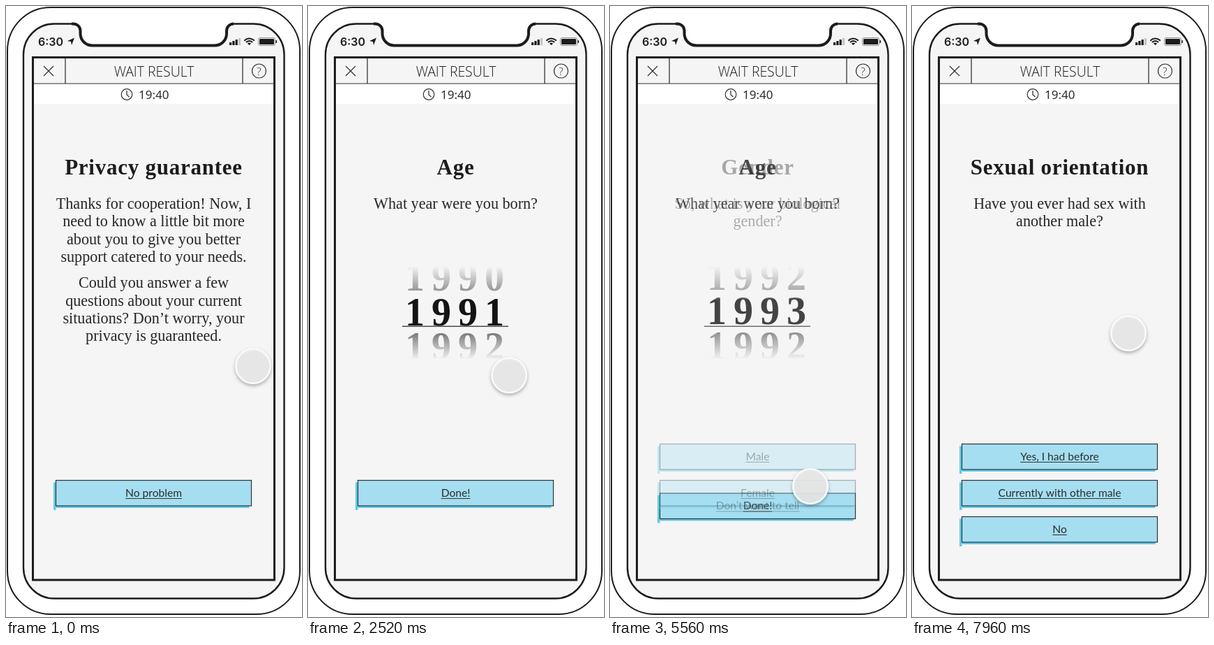
An HTML page with a canvas that plays this animation: 424 px wide and 874 px high, repeating every 8000 ms.

```html
<!DOCTYPE html>
<html lang="en">
<head>
<meta charset="utf-8">
<title>Questionnaire prototype</title>
<style>
  html, body { margin: 0; width: 100%; height: 100%; overflow: hidden; background: #fff; }
  canvas { display: block; width: 424px; height: 874px; }
</style>
</head>
<body>
<canvas id="stage"></canvas>
<script>
const W = 424, H = 874, LOOP = 8000, MID = 211.5;
const INK = '#1c1c1c', PAPER = '#f5f5f5';
const SERIF = '"Liberation Serif", serif';
const SANS = '"Noto Sans", sans-serif';
const LIGHT = '"Open Sans", sans-serif';
const canvas = document.getElementById('stage');
const ctx = canvas.getContext('2d');
const dpr = window.devicePixelRatio || 1;
canvas.width = W * dpr;
canvas.height = H * dpr;

const clamp = v => Math.min(1, Math.max(0, v));
const ease = p => p * p * (3 - 2 * p);
const ramp = (t, start, ms) => ease(clamp((t - start) / ms));
const mix = (a, b, p) => a + (b - a) * p;

const screens = [
  {
    title: 'Privacy guarantee',
    lines: ['Thanks for cooperation! Now, I', 'need to know a little bit more',
      'about you to give you better', 'support catered to your needs.',
      'Could you answer a few', 'questions about your current',
      'situations? Don’t worry, your', 'privacy is guaranteed.'],
    labels: ['', 'No problem', '']
  },
  { title: 'Age', lines: ['What year were you born?'], labels: ['', 'Done!', ''] },
  {
    title: 'Gender',
    lines: ['So, what is your biological', 'gender?'],
    labels: ['Male', 'Female', 'Don’t want to tell']
  },
  {
    title: 'Sexual orientation',
    lines: ['Have you ever had sex with', 'another male?'],
    labels: ['Yes, I had before', 'Currently with other male', 'No']
  }
];
const FADES = [1000, 5400, 6600], FADE_MS = 400;
const buttonY = i => 626.5 + i * 52;

const YEARS = [1990, 1991, 1992, 1993, 1992];
const ROW = 49.5;

// Cursor moves: start, duration, destination
const MOVES = [
  { at: 0, ms: 600, x: 345, y: 689 },
  { at: 1700, ms: 1300, x: 263, y: 457 },
  { at: 3200, ms: 1000, x: 287, y: 447 },
  { at: 4450, ms: 700, x: 287, y: 687 },
  { at: 5700, ms: 650, x: 300, y: 632 },
  { at: 7000, ms: 700, x: 310, y: 468 }
];
const HOLDS = [[700, 900], [2950, 4350], [5200, 5350], [6400, 6550]];

function line(color, width, ...points) {
  ctx.strokeStyle = color;
  ctx.lineWidth = width;
  ctx.beginPath();
  points.forEach(([x, y]) => ctx.lineTo(x, y));
  ctx.stroke();
}

function disc(x, y, r) {
  ctx.beginPath();
  ctx.arc(x, y, r, 0, Math.PI * 2);
}

function text(str, x, y, font, { color = INK, align = 'center', spacing = 0 } = {}) {
  ctx.font = font;
  ctx.fillStyle = color;
  ctx.textAlign = align;
  ctx.letterSpacing = spacing + 'px';
  ctx.fillText(str, x, y);
}

function layer(alpha, draw) {
  if (alpha <= 0) return;
  ctx.save();
  ctx.globalAlpha = alpha;
  draw();
  ctx.restore();
}

// Runs the current path round the notch, left to right
function notchPath() {
  ctx.arcTo(106.5, 25.5, 106.5, 40, 10);
  ctx.arcTo(106.5, 56.5, 150, 56.5, 17);
  ctx.arcTo(316, 56.5, 316, 40, 17);
  ctx.arcTo(316, 25.5, 340, 25.5, 10);
}

function drawPhone() {
  const l = 25, r = 398.5, top = 25.5, bottom = 847.5, radius = 44;
  ctx.fillStyle = '#fff';
  ctx.fillRect(0, 0, W, H);
  ctx.strokeStyle = INK;
  ctx.lineWidth = 2;
  ctx.beginPath();
  ctx.roundRect(2, 2, 419, 868, 62);
  ctx.stroke();

  ctx.beginPath();
  ctx.moveTo(l + radius, top);
  notchPath();
  ctx.arcTo(r, top, r, bottom, radius);
  ctx.arcTo(r, bottom, l, bottom, radius);
  ctx.arcTo(l, bottom, l, top, radius);
  ctx.arcTo(l, top, r, top, radius);
  ctx.closePath();
  ctx.fillStyle = PAPER;
  ctx.fill();
  ctx.lineWidth = 2.4;
  ctx.stroke();

  ctx.lineWidth = 4;
  ctx.beginPath();
  ctx.moveTo(94, top);
  notchPath();
  ctx.stroke();
}

function drawStatus() {
  text('6:30', 46, 56.5, '600 16px Inter, sans-serif', { align: 'left' });
  ctx.beginPath();
  [[98, 45.5], [94, 56], [93, 51], [88, 50]].forEach(([x, y]) => ctx.lineTo(x, y));
  ctx.fill();

  for (let i = 0; i < 4; i++) {
    ctx.fillStyle = i < 3 ? INK : '#c4c4c4';
    const h = 4 + i * 2;
    ctx.fillRect(320 + i * 4.3, 56 - h, 3.2, h);
  }
  ctx.strokeStyle = INK;
  for (const [r, width] of [[9.5, 2], [6, 2], [1.7, 3.4]]) {
    ctx.lineWidth = width;
    ctx.beginPath();
    ctx.arc(348.5, 56, r, -Math.PI * 0.77, -Math.PI * 0.23);
    ctx.stroke();
  }

  ctx.fillStyle = INK;
  ctx.lineWidth = 0.8;
  ctx.strokeStyle = '#777';
  ctx.beginPath();
  ctx.roundRect(361.5, 45.5, 24, 11, 2.5);
  ctx.stroke();
  ctx.beginPath();
  ctx.roundRect(363, 47, 21, 8, 1.2);
  ctx.fill();
  ctx.fillRect(386.5, 49, 1.5, 4);
}

function drawHeader() {
  ctx.fillStyle = '#fff';
  ctx.fillRect(38, 111, 346, 29);
  line('#333', 1.2, [38, 111], [384, 111]);
  for (const x of [85, 339]) line('#333', 1.3, [x, 74], [x, 111]);
  ctx.strokeStyle = INK;
  ctx.lineWidth = 3;
  ctx.strokeRect(38.5, 73.5, 346, 747.5);

  line('#333', 1.3, [54, 86], [68, 100]);
  line('#333', 1.3, [68, 86], [54, 100]);
  text('WAIT RESULT', 212, 100.5, '300 19.4px ' + LIGHT);
  disc(362.5, 93, 10);
  ctx.lineWidth = 1.2;
  ctx.stroke();
  text('?', 362.5, 98.5, '300 15px ' + LIGHT);

  disc(173, 126.5, 7.8);
  ctx.stroke();
  line('#333', 1.3, [173, 121], [173, 127], [176.5, 130]);
  text('19:40', 190, 132.5, '17px ' + SANS, { align: 'left', color: '#2c2c2c' });
}

function drawCopy({ title, lines }) {
  text(title, MID, 241, 'bold 31px ' + SERIF, { spacing: 0.75 });
  lines.forEach((str, i) => {
    const y = 290 + i * 25.3 + (i > 3 ? 12 : 0);
    text(str, MID, y, '22.15px ' + SERIF, { color: '#262626' });
  });
}

// The wheel gives a little, spins two years on, then settles
function wheelPosition(t) {
  return 1 - 0.07 * ramp(t, 2950, 250) + 1.84 * ramp(t, 3220, 1020) + 0.26 * ramp(t, 4240, 350);
}

function drawWheel(t) {
  const top = 372, bottom = 504;
  const ink = ctx.createLinearGradient(0, top, 0, bottom);
  const stop = (y, a) => ink.addColorStop((y - top) / (bottom - top), `rgba(20,20,20,${a})`);
  stop(top, 0);
  stop(414, 0.5);
  stop(420, 1);
  stop(464, 1);
  stop(468, 0.55);
  stop(bottom, 0.03);
  ctx.save();
  ctx.beginPath();
  ctx.rect(130, top, 165, bottom - top);
  ctx.clip();
  const pos = wheelPosition(t);
  YEARS.forEach((year, row) => {
    const y = 456.5 + (row - pos) * ROW;
    [...String(year)].forEach((digit, i) =>
      text(digit, 153 + i * 38, y, 'bold 56px ' + SERIF, { color: ink }));
  });
  ctx.restore();
  line('#4a4a4a', 1.4, [135, 458.3], [287, 458.3]);
}

function drawBox(y) {
  const x = 71.5, w = 280, h = 36.5;
  ctx.fillStyle = '#62cae8';
  ctx.fillRect(x - 3.5, y + 3, 3.5, h + 3);
  ctx.fillRect(x, y + h, w - 3, 3);
  ctx.fillStyle = '#a5def1';
  ctx.fillRect(x, y, w, h);
  ctx.strokeStyle = '#333';
  ctx.lineWidth = 1.2;
  ctx.strokeRect(x, y, w, h);
}

function drawLabel(str, y) {
  if (!str) return;
  text(str, MID, y + 23, '15.6px Lato, sans-serif', { color: '#2c2c2c' });
  const half = ctx.measureText(str).width / 2;
  line('#333', 1.1, [MID - half, y + 26], [MID + half, y + 26]);
}

function drawButtons(from, to, p, fade) {
  const before = screens[from].labels, after = screens[to].labels;
  const opening = !before[0] && after[0];
  const y = i => buttonY(i);
  if (opening) {
    // The single button slides down to become the third
    const slide = mix(y(1), y(2), p);
    drawBox(slide);
    layer(p, () => {
      for (const i of [0, 1]) {
        drawBox(y(i));
        drawLabel(after[i], y(i));
      }
      drawLabel(after[2], slide);
    });
    layer(fade, () => drawLabel(before[1], slide));
    return;
  }
  after.forEach((label, i) => {
    if (!label) return;
    drawBox(y(i));
    layer(fade, () => drawLabel(before[i], y(i)));
    layer(p, () => drawLabel(label, y(i)));
  });
}

function drawCursor(t) {
  let x = 354, y = 515;
  for (const move of MOVES) {
    const p = ramp(t, move.at, move.ms);
    x = mix(x, move.x, p);
    y = mix(y, move.y, p);
  }
  const show = 1 - ramp(t, 1000, 300) + ramp(t, 2250, 250);
  const press = Math.max(...HOLDS.map(([a, b]) => ramp(t, a, 100) - ramp(t, b, 100)));
  layer(show * (1 - press) * 0.85, () => {
    ctx.shadowColor = 'rgba(0,0,0,0.35)';
    ctx.shadowBlur = 5 * dpr;
    ctx.shadowOffsetY = 2.5 * dpr;
    ctx.fillStyle = '#f0f0f0';
    disc(x, y, 26);
    ctx.fill();
    ctx.shadowColor = 'transparent';
    ctx.strokeStyle = '#fdfdfd';
    ctx.lineWidth = 2.5;
    disc(x, y, 24.7);
    ctx.stroke();
  });
  layer(show * press * 0.48, () => {
    ctx.fillStyle = '#fff';
    disc(x, y, 26);
    ctx.fill();
  });
}

function render(t) {
  ctx.setTransform(dpr, 0, 0, dpr, 0, 0);
  drawPhone();
  drawStatus();
  drawHeader();

  const to = Math.max(1, FADES.filter(at => t >= at).length), from = to - 1;
  const p = ramp(t, FADES[from], FADE_MS);
  const fade = 1 - p ** 1.5;
  for (const [index, alpha] of [[to, p], [from, fade]]) {
    layer(alpha, () => {
      drawCopy(screens[index]);
      if (index === 1) drawWheel(t);
    });
  }
  drawButtons(from, to, p, fade);
  drawCursor(t);
}

const start = performance.now();
function tick() {
  render((performance.now() - start) % LOOP);
  requestAnimationFrame(tick);
}
tick();
</script>
</body>
</html>
```
